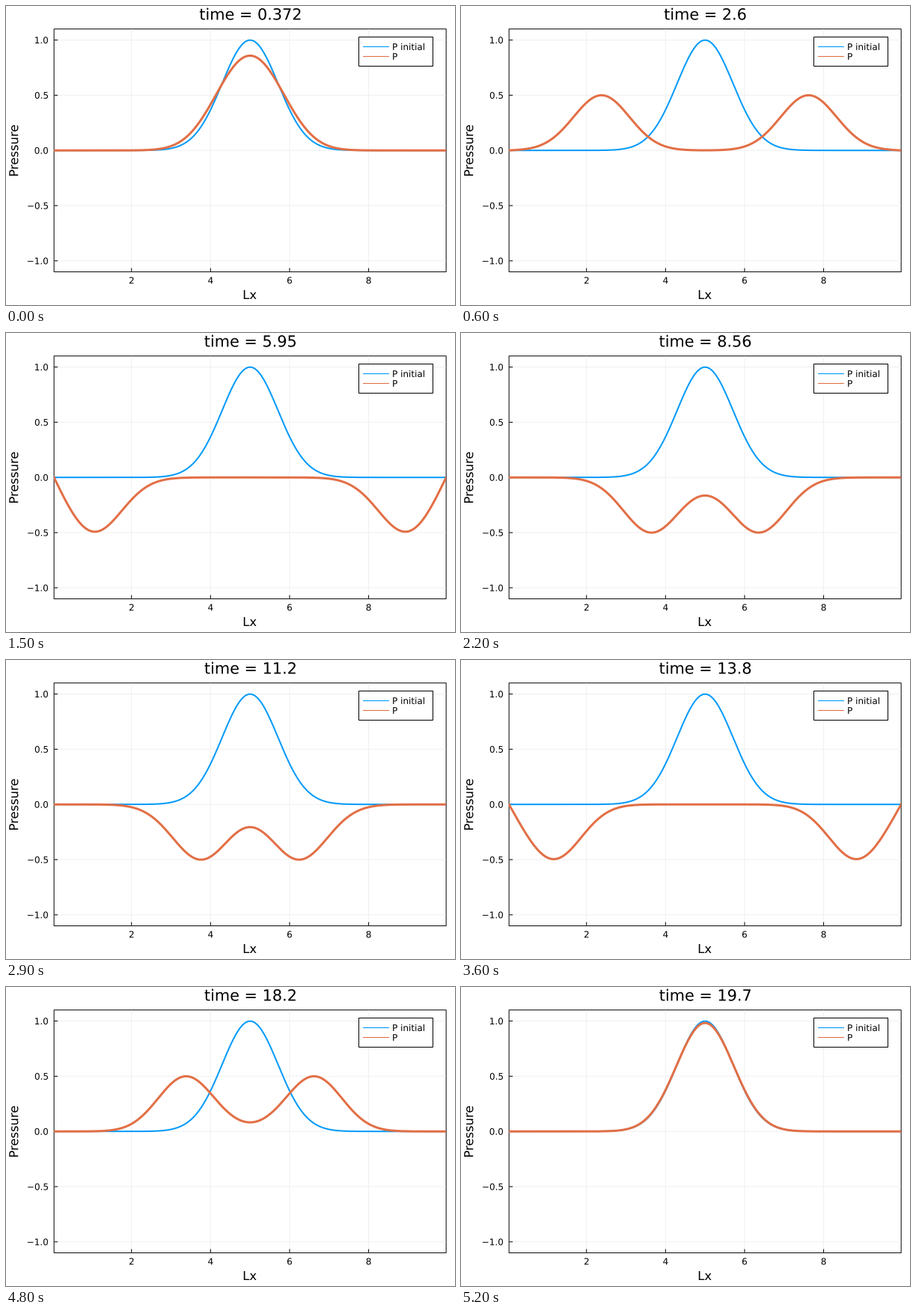
A matplotlib script for the animation above (5.3 s loop, 600 by 400 pixels).

```python
import numpy as np
import matplotlib.pyplot as plt
from matplotlib.animation import FuncAnimation
from matplotlib.patches import PathPatch, Rectangle
from matplotlib.textpath import TextPath
from matplotlib.transforms import Affine2D

plt.rcParams.update({"font.family": "DejaVu Sans", "path.snap": False})

W, H = 600, 400
DPI = 72  # one point equals one pixel
LEFT, RIGHT, TOP, BOTTOM = 64.15, 588.15, 30.75, 355.65
MID_X, MID_Y = (LEFT + RIGHT) / 2, (TOP + BOTTOM) / 2
Y_MAX = 1.1
BLUE, ORANGE = "#009afa", "#e26f46"
GRID = "#f0f0f0"

# 1D acoustic wave on a staggered grid
LENGTH, CELLS = 10.0, 128
FRAMES, STEPS = 53, 10
dx = LENGTH / CELLS
dt = dx / 2.1
x = np.linspace(dx / 2, LENGTH - dx / 2, CELLS)
start = np.exp(-(x - LENGTH / 2) ** 2)


def simulate():
    """Pressure after every STEPS time steps, with fixed ends."""
    p, v = start.copy(), np.zeros(CELLS - 1)
    states = []
    for _ in range(FRAMES):
        for _ in range(STEPS):
            v -= dt * np.diff(p) / dx
            p[1:-1] -= dt * np.diff(v) / dx
        states.append(p.copy())
    return states


def text_path(px, py, text, size, align=0.5, angle=0):
    """Outline of text; align 0, 0.5, 1 puts its left, middle, right at px."""
    path = TextPath((0, 0), text, size=size)
    box = path.get_extents()
    anchor = box.x0 + align * box.width
    move = Affine2D().translate(-anchor, 0).scale(1, -1)
    return move.rotate_deg(-angle).translate(px, py).transform_path(path)


def label(*args, **kw):
    return canvas.add_patch(PathPatch(text_path(*args, **kw), fc="black", lw=0))


def line(x0, y0, x1, y1, color="black", lw=1):
    canvas.plot([x0, x1], [y0, y1], color=color, lw=lw,
                solid_capstyle="butt")


def box(x0, y0, x1, y1):
    canvas.add_patch(Rectangle((x0, y0), x1 - x0, y1 - y0,
                               fc="white", ec="black", lw=1, zorder=2))


def title_path(i):
    time = (i + 1) * STEPS * dt
    return text_path(MID_X, 18.4, f"time = {float(f'{time:.3g}')}", 20.8)


states = simulate()

fig = plt.figure(figsize=(W / DPI, H / DPI), dpi=DPI, facecolor="white")

# Everything but the curves is laid out in pixels from the top left
canvas = fig.add_axes([0, 0, 1, 1])
canvas.set_autoscale_on(False)
canvas.set(xlim=(0, W), ylim=(H, 0))
canvas.axis("off")

box(LEFT, TOP, RIGHT, BOTTOM)
for t in (2, 4, 6, 8):
    px = LEFT + (t - x[0]) / (x[-1] - x[0]) * (RIGHT - LEFT)
    line(px, TOP + 0.5, px, BOTTOM - 0.5, GRID)
    line(px, BOTTOM, px, BOTTOM - 5)
    label(px, 371.4, str(t), 12)
for t in (-1, -0.5, 0, 0.5, 1):
    py = MID_Y - t / Y_MAX * (BOTTOM - TOP) / 2
    line(LEFT + 0.5, py, RIGHT - 0.5, py, GRID)
    line(LEFT, py, LEFT + 5, py)
    label(56, py + 4.5, f"{t:.1f}".replace("-", "\u2212"), 12, align=1)

label(MID_X, 392, "Lx", 16.4)
label(16.2, MID_Y, "Pressure", 16.4, angle=90)
title = canvas.add_patch(PathPatch(title_path(0), fc="black", lw=0))

# Legend
box(471.5, 41.5, 570.5, 80.5)
for py, color, name in [(54.5, BLUE, "P initial"), (67.5, ORANGE, "P")]:
    line(477, py, 512, py, color, 1.1)
    label(517.2, py + 4.4, name, 12, align=0).set_zorder(3)

# Curves
ax = fig.add_axes([LEFT / W, 1 - BOTTOM / H,
                   (RIGHT - LEFT) / W, (BOTTOM - TOP) / H])
ax.set(xlim=(x[0], x[-1]), ylim=(-Y_MAX, Y_MAX))
ax.axis("off")
ax.plot(x, start, color=BLUE, lw=2)
wave, = ax.plot(x, states[0], color=ORANGE, lw=3)


def draw(i):
    title.set_path(title_path(i))
    wave.set_ydata(states[i])
    return wave, title


anim = FuncAnimation(fig, draw, frames=FRAMES, interval=100,
                     repeat=True, repeat_delay=0)
plt.show()
```
